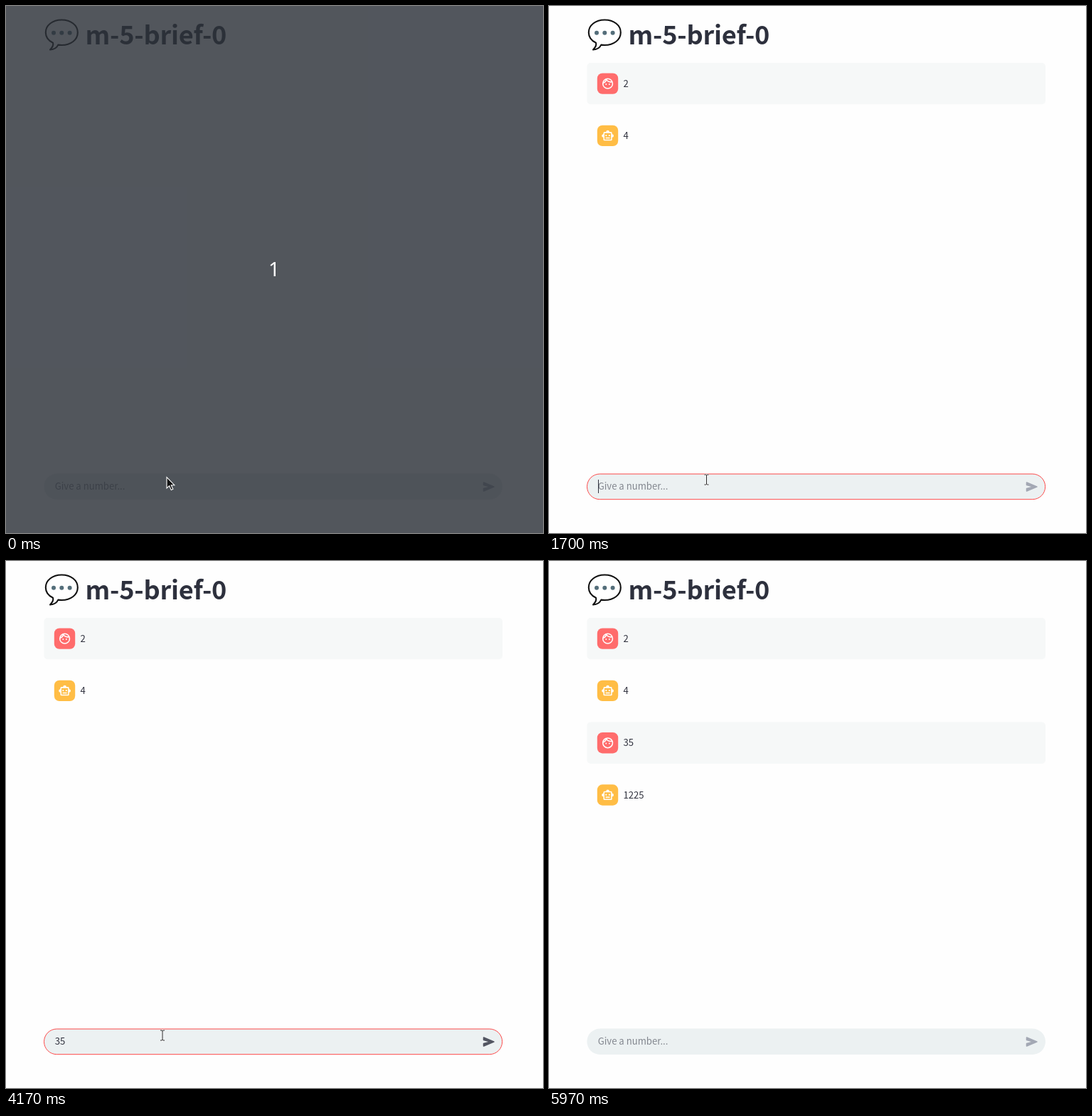
Animation of 755x741 px, one loop 6.03 s. Source, as an HTML page:

```html
<!DOCTYPE html>
<html lang="en">
<head>
<meta charset="utf-8">
<title>Number chat</title>
<style>
  html, body { margin: 0; width: 100%; height: 100%; overflow: hidden; background: #fefefe; }
  svg { display: block; width: 100%; height: 100%; }
  text { font: 13.13px "Noto Sans CJK JP", "Noto Sans CJK SC", "Noto Sans CJK", "Noto Sans", sans-serif; fill: #31333f; }
  #title { font-size: 36.1px; font-weight: 700; letter-spacing: -0.2px; fill: #2d303d; }
  #count { font: 28px "Noto Sans", "Open Sans", sans-serif; fill: #fff; text-anchor: middle; }
</style>
</head>
<body>
<svg viewBox="0 0 755 741" xmlns="http://www.w3.org/2000/svg">
  <defs>
    <g id="user">
      <rect x="67.8" y="14.4" width="29.4" height="29.4" rx="7.3" fill="#ff6c6c"/>
      <g transform="translate(73.4 20) scale(.764)" fill="none" stroke="#fff" stroke-width="2">
        <circle cx="12" cy="12" r="9"/>
        <path d="M9.4 4.2C11 7.2 14 9 17.5 9c1 0 1.9-.1 2.7-.4M3.5 11C6.300 10 8.500 7.800 9.500 4.500"/>
        <g fill="#fff" stroke="none"><circle cx="9" cy="13" r="1.25"/><circle cx="15" cy="13" r="1.25"/></g>
      </g>
    </g>
    <g id="bot">
      <rect x="67.8" y="14.4" width="29.4" height="29.4" rx="7.3" fill="#ffbd45"/>
      <g transform="translate(73.4 20) scale(.764)" fill="#fff">
        <path fill-rule="evenodd" d="M20 9V7a2 2 0 0 0-2-2h-3a3 3 0 0 0-6 0H6a2 2 0 0 0-2 2v2a3 3 0 0 0 0 6v4a2 2 0 0 0 2 2h12a2 2 0 0 0 2-2v-4a3 3 0 0 0 0-6zM18 19H6V7h12z"/>
        <circle cx="9" cy="11.500" r="1.5"/><circle cx="15" cy="11.500" r="1.5"/>
        <path d="M8 15h8v2H8z"/>
      </g>
    </g>
  </defs>

  <rect width="755" height="741" fill="#fefefe"/>

  <path d="M78.300 19.500C65.500 19.500 55.800 27 55.800 37.300c0 6.500 3.800 11.500 10.200 14.500 1 3.200-1 6.700-4 9.700 5.500-.3 9.500-3 11.300-6.900 1.600.3 3.300.4 5 .4 12.800 0 22.500-7.400 22.500-17.700S91.100 19.500 78.300 19.500z"
    fill="#fff" stroke="#111" stroke-width="2.100" stroke-linejoin="round"/>
  <g fill="#546e7a"><circle cx="67" cy="37.800" r="3"/><circle cx="78.300" cy="37.800" r="3"/><circle cx="89.600" cy="37.800" r="3"/></g>
  <text id="title" x="111.500" y="54.300">m-5-brief-0</text>

  <g id="rows"></g>

  <rect x="53.400" y="657.500" width="644.600" height="36.500" rx="18.250" fill="#ecf1f2"/>
  <rect id="ring" x="53.500" y="658" width="644.200" height="35.700" rx="17.850" fill="none" stroke="#ff4b4b"/>
  <text id="entry" x="68.700" y="679.700"></text>
  <rect id="caret" y="666" width="1" height="19" fill="#31333f"/>
  <path id="send" transform="translate(668 665) scale(.917)"
    d="M3 5.510v3.710c0 .46.31.86.76.97L11 12l-7.240 1.810c-.45.11-.76.51-.76.97v3.710c0 .72.73 1.200 1.390.92l15.420-6.490c.82-.34.82-1.500 0-1.840L4.390 4.580C3.730 4.310 3 4.790 3 5.510z"/>

  <g id="shade">
    <rect width="755" height="741" fill="#2b3038" fill-opacity=".815"/>
    <text id="count" x="377" y="380.300">1</text>
  </g>

  <g id="beam" fill="none">
    <path d="M-3-7h2.200L0-6.200.8-7H3M0-6.500v13M-3 7h2.200L0 6.200.8 7H3" stroke="#fff" stroke-width="2.400" opacity=".8"/>
    <path d="M-3-7h2.200L0-6.200.8-7H3M0-6.500v13M-3 7h2.200L0 6.200.8 7H3" stroke="#222" stroke-width="1"/>
  </g>
  <path id="arrow" d="M0 0v15.500l3.600-3.300 2.700 5.700 2.500-1.200-2.600-5.500h4.600z" fill="#111" stroke="#fff" stroke-width="1.100"/>
</svg>
<script>
  const LOOP = 6030, ROW = 73.3, DIGIT = 7.29;
  const $ = id => document.getElementById(id);
  const messages = [
    { at: 1270, who: "user", text: "2" },
    { at: 1330, who: "bot", text: "4" },
    { at: 4200, who: "user", text: "35" },
    { at: 4270, who: "bot", text: "1225" }
  ];
  const typing = [[0, ""], [1230, "2"], [1270, ""], [3200, "3"], [3570, "35"], [4200, ""]];
  const blinks = [[0, 0], [430, 1], [1030, 0], [1230, 1], [1870, 0], [2430, 1], [4170, 0], [4770, 1], [5370, 0]];

  $("rows").innerHTML = messages.map((m, i) => `<g transform="translate(0 ${80 + i * ROW})">` +
    (m.who === "user" ? '<rect x="53.400" width="644.600" height="58.300" rx="5" fill="#f6f8f8"/>' : "") +
    `<use href="#${m.who}"/><text x="104.400" y="33.700">${m.text}</text></g>`).join("");
  const rows = [...$("rows").children];

  const show = (el, on) => el.setAttribute("visibility", on ? "visible" : "hidden");
  const latest = (steps, t) => steps.filter(s => s[0] <= t).pop()[1];
  const ease = (t, a, b) => {
    const k = Math.min(1, Math.max(0, (t - a) / (b - a)));
    return k * k * (3 - 2 * k);
  };

  function pointer(t) {
    const nudge = ease(t, 1430, 1830), exit = ease(t, 4940, 5370);
    return [226 - 6 * nudge + 103 * exit, 663 + 4 * nudge - 656 * exit];
  }

  function draw(t) {
    const value = latest(typing, t);
    const focused = t >= 430 && t < 5970;
    const [x, y] = pointer(t);
    const intro = t < 30, inside = t < 5370;
    const arrow = intro || y < 657;

    rows.forEach((row, i) => show(row, t >= messages[i].at));
    $("entry").textContent = value || "Give a number...";
    $("entry").style.fill = value ? "#31333f" : "#82868e";
    $("send").setAttribute("fill", value ? "#535662" : "#a3a8b4");
    show($("ring"), focused);
    show($("caret"), focused && latest(blinks, t));
    $("caret").setAttribute("x", 69 + Math.round(value.length * DIGIT));

    show($("shade"), intro);
    show($("arrow"), inside && arrow);
    show($("beam"), inside && !arrow);
    $("arrow").setAttribute("transform", `translate(${x} ${y - 0.5})`);
    $("beam").setAttribute("transform", `translate(${x} ${y})`);
  }

  const start = performance.now();
  function tick(now) {
    draw(Math.max(0, now - start) % LOOP);
    requestAnimationFrame(tick);
  }
  draw(0);
  requestAnimationFrame(tick);
</script>
</body>
</html>
```
